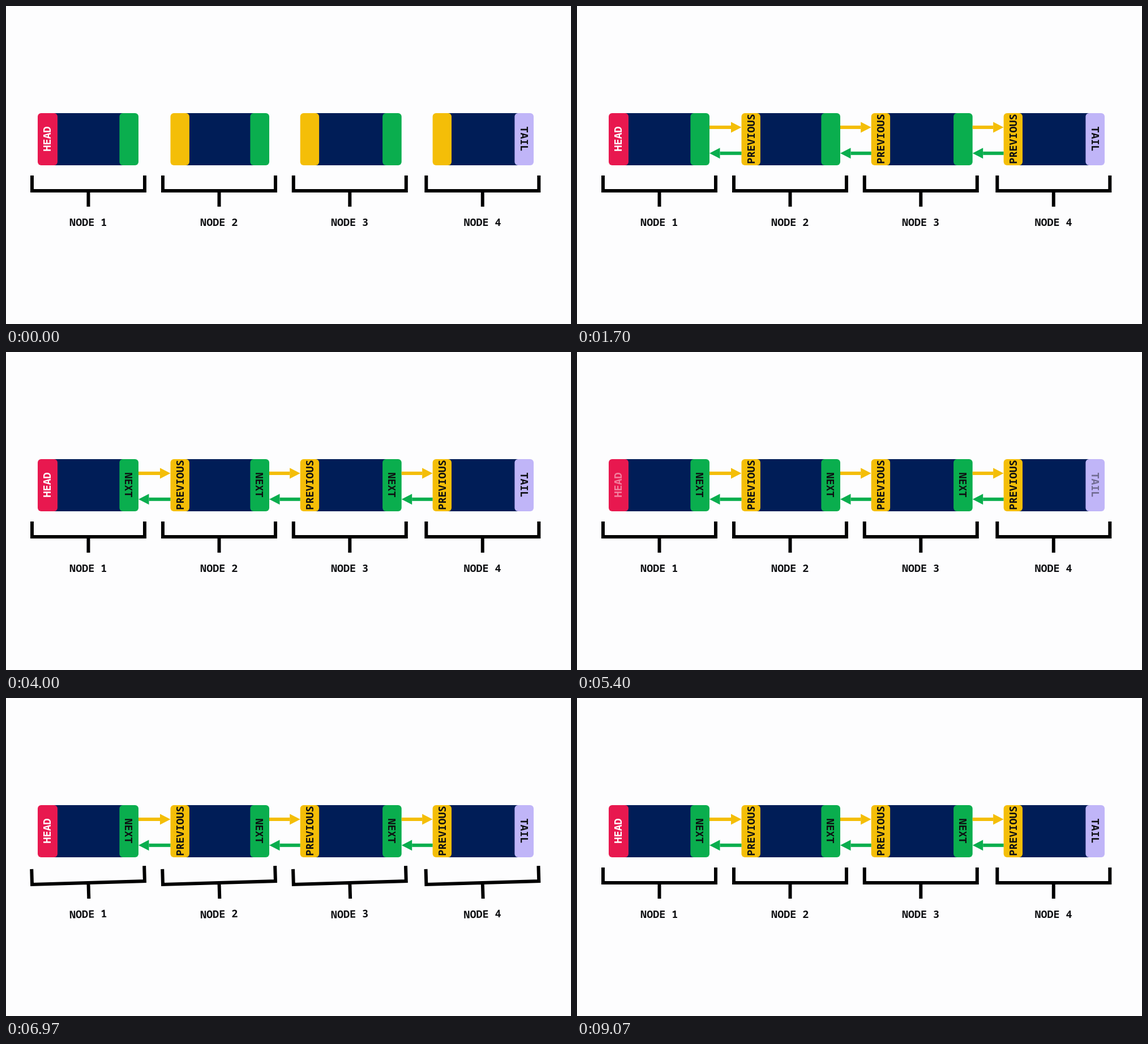
An HTML page with a canvas that plays this animation: 998x561 px, repeating every 9160 ms.

```html
<!DOCTYPE html>
<html lang="en">
<head>
<meta charset="utf-8">
<title>Doubly linked list</title>
<style>
  html, body { margin: 0; width: 100%; height: 100%; overflow: hidden; background: #fdfdfe; }
  canvas { display: block; }
</style>
</head>
<body>
<canvas id="stage" width="998" height="561"></canvas>
<script>
const ctx = document.getElementById('stage').getContext('2d');
const LOOP = 9160;
const TOP = 189, HEIGHT = 92, MID_Y = 233.7;
const PAPER = '#fdfdfe', INK = '#0e0f12', NAVY = '#001d57';
const RED = '#e8184f', YELLOW = '#f4be08', GREEN = '#0aae4e', LILAC = '#c0b5f8';

const nodes = [
  { left: 56, right: 234, mid: 145.5 },
  { left: 290.5, right: 465, mid: 376.5 },
  { left: 519.7, right: 698.7, mid: 607.3 },
  { left: 753.6, right: 932, mid: 841.8 }
];

const ramp = (t, from, to) => Math.min(1, Math.max(0, (t - from) / (to - from)));

function withAlpha(alpha, draw) {
  if (alpha <= 0) return;
  ctx.save();
  ctx.globalAlpha = alpha;
  draw();
  ctx.restore();
}

function tab(x, width, color) {
  ctx.fillStyle = color;
  ctx.beginPath();
  ctx.roundRect(x, TOP, width, HEIGHT, 6);
  ctx.fill();
}

// Text centred on x, with y as its baseline, turned about that point.
function label(text, x, y, angle, color) {
  ctx.save();
  ctx.translate(x, y);
  ctx.rotate(angle);
  ctx.fillStyle = color;
  ctx.fillText(text, 0, 0);
  ctx.restore();
}

const upward = (text, x, color) => label(text, x, MID_Y + 0.8, -Math.PI / 2, color);
const downward = (text, x, color) => label(text, x, MID_Y + 0.8, Math.PI / 2, color);

function arrow(from, tip, y, color) {
  const neck = tip - Math.sign(tip - from) * 18.5;
  ctx.fillStyle = color;
  ctx.fillRect(Math.min(from, neck), y - 3, Math.abs(neck - from), 6);
  ctx.beginPath();
  ctx.moveTo(tip, y);
  ctx.lineTo(neck, y - 9.5);
  ctx.lineTo(neck, y + 9.5);
  ctx.fill();
}

function drawNode(node, i) {
  const first = i === 0, last = i === nodes.length - 1;
  const tabWidth = first ? 35 : 33.4;
  ctx.fillStyle = NAVY;
  ctx.fillRect(node.left + 12, TOP, node.right - node.left - 24, HEIGHT);
  tab(node.left, tabWidth, first ? RED : YELLOW);
  tab(node.right - 33.6, 33.6, last ? LILAC : GREEN);
}

function drawBracket(node, i, angle) {
  ctx.save();
  ctx.translate(node.mid, 326);
  ctx.rotate(angle);
  ctx.strokeStyle = '#000';
  ctx.lineWidth = 6;
  ctx.beginPath();
  ctx.moveTo(-99.5, -27);
  ctx.lineTo(-99.5, 0);
  ctx.lineTo(99.5, 0);
  ctx.lineTo(99.5, -27);
  ctx.moveTo(0, 0);
  ctx.lineTo(0, 28);
  ctx.stroke();
  ctx.translate(-0.3, 55);
  ctx.rotate(-angle);
  ctx.rotate(angle);
  ctx.restore();

  ctx.save();
  ctx.translate(node.mid - 0.3, 381);
  ctx.rotate(angle);
  label('NODE ' + (i + 1), 0, 6.7, 0, INK);
  ctx.restore();
}

function draw(t) {
  const arrows = ramp(t, 30, 730);
  const previous = ramp(t, 1000, 1370);
  const next = ramp(t, 3200, 3670);
  const ends = 1 - ramp(t, 5000, 5190) + ramp(t, 5190, 5660);
  const swing = Math.sin(2 * Math.PI * ramp(t, 6230, 7130)) * 1.88 * Math.PI / 180;

  ctx.fillStyle = PAPER;
  ctx.fillRect(0, 0, 998, 561);
  ctx.font = '700 18.4px "Noto Sans Mono", "DejaVu Sans Mono", monospace';
  ctx.textAlign = 'center';

  nodes.forEach(drawNode);
  nodes.forEach((node, i) => drawBracket(node, i, swing));

  withAlpha(arrows, () => {
    for (let i = 0; i < nodes.length - 1; i++) {
      const a = nodes[i].right, b = nodes[i + 1].left;
      arrow(a, b, 214, YELLOW);
      arrow(b, a, 259.8, GREEN);
    }
  });
  withAlpha(previous, () => {
    for (const node of nodes.slice(1)) upward('PREVIOUS', node.left + 23.3, INK);
  });
  withAlpha(next, () => {
    for (const node of nodes.slice(0, -1)) downward('NEXT', node.right - 23.6, INK);
  });
  withAlpha(ends, () => {
    upward('HEAD', 78.6, '#fff');
    downward('TAIL', 909.4, INK);
  });
}

const start = performance.now();
function tick() {
  draw((performance.now() - start) % LOOP);
  requestAnimationFrame(tick);
}
draw(0);
requestAnimationFrame(tick);
</script>
</body>
</html>
```
